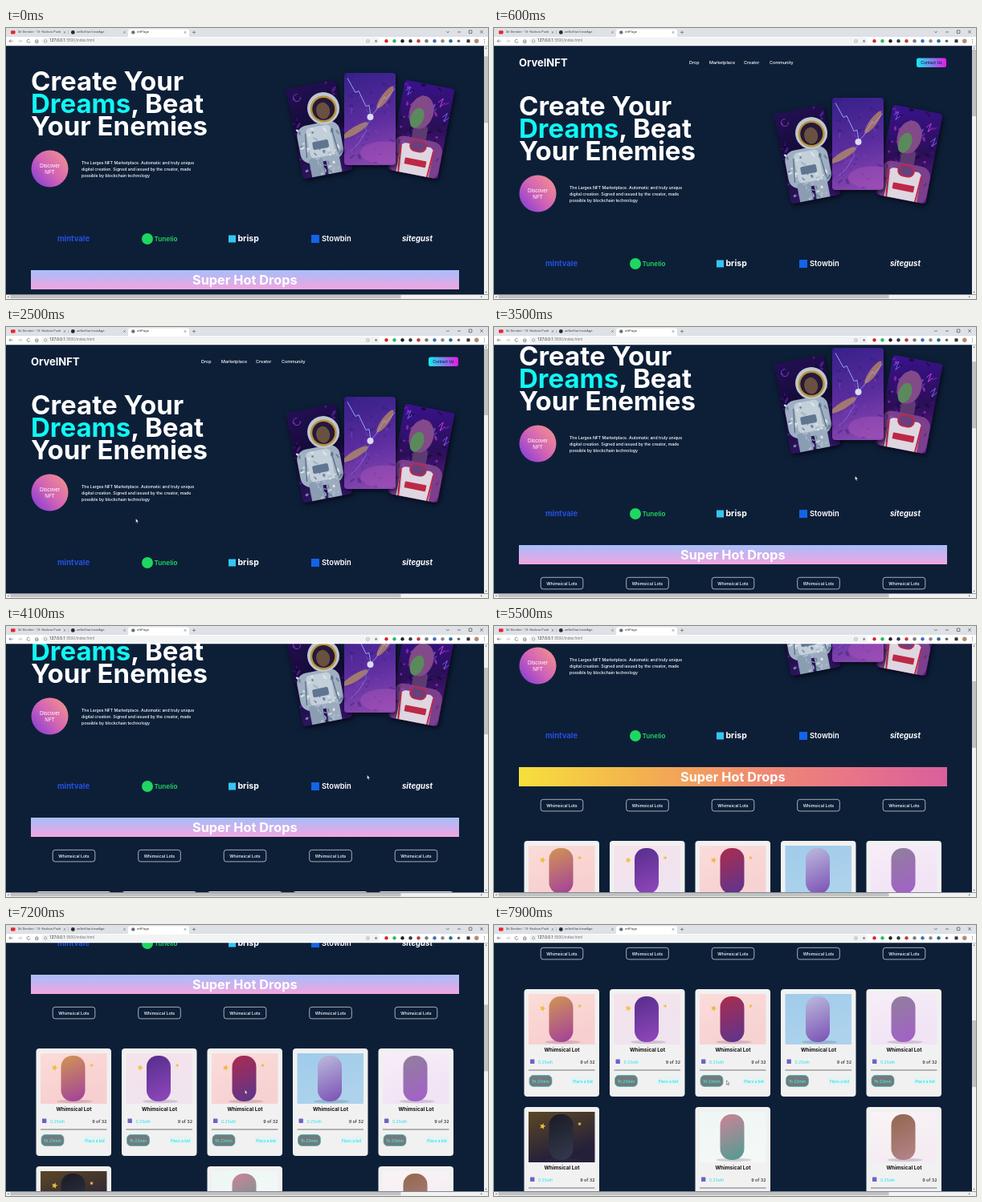
Write an HTML page with a canvas that moves like this. It is 600 px wide and 338 px high and loops after 8 s.

```html
<!DOCTYPE html>
<html lang="en">
<head>
<meta charset="utf-8">
<title>nftPage</title>
<style>
html, body { margin: 0; width: 100%; height: 100%; overflow: hidden; background: #0d1f37; }
#stage { position: relative; width: 600px; height: 338px; overflow: hidden; font-family: Inter, "Open Sans", sans-serif; }
#view { position: absolute; left: 0; top: 22px; width: 595px; height: 310px; overflow: hidden; background: #0d1f37; }
#page { position: absolute; left: 0; top: -22px; width: 600px; height: 690px; will-change: transform; }
canvas { position: absolute; left: 0; top: 0; }
.t { position: absolute; line-height: 0; white-space: pre; }
.c { transform: translateX(-50%); }
.r { transform: translateX(-100%); }
.ui { font-family: Roboto, "Liberation Sans", sans-serif; }
#banner { position: absolute; left: 31px; top: 333.3px; width: 532.5px; height: 23.5px; background: linear-gradient(#a6bff8, #cbb0ee 50%, #f3a6df); }
#banner.hot { background: linear-gradient(90deg, #f6e03c, #f3b24e 28%, #ef8b70 55%, #e87488 78%, #d95f9c); }
#thumb { position: absolute; left: 595.3px; top: 27px; width: 4.3px; height: 83px; background: #c1c1c1; }
#mouse { position: absolute; left: 0; top: 0; }
</style>
</head>
<body>
<div id="stage">
  <div id="view"><div id="page"><canvas id="art"></canvas><div id="banner"></div></div></div>
  <canvas id="frame"></canvas>
  <div id="thumb"></div>
  <svg id="mouse" width="6" height="8" viewBox="0 0 6 8"><path d="M.5 .3V5.6L1.7 4.5 2.5 6.4 3.3 6 2.5 4.2H4.1Z" fill="#fff" stroke="#111" stroke-width=".4"/></svg>
</div>
<script>
const $ = id => document.getElementById(id);
const stage = $('stage'), page = $('page'), banner = $('banner'), mouse = $('mouse'), thumb = $('thumb');
const COLS = [37.5, 144, 250.5, 357, 463.5];
const MID = 47;

function context(id, w, h) {
  const cv = $(id), k = window.devicePixelRatio || 1;
  cv.width = w * k; cv.height = h * k;
  cv.style.width = w + 'px'; cv.style.height = h + 'px';
  const g = cv.getContext('2d');
  g.scale(k, k);
  return g;
}

function text(box, x, y, size, weight, color, str, align = '', extra = '') {
  const d = document.createElement('div');
  d.className = 't ' + align;
  d.style.cssText = `left:${x}px;top:${y}px;font-size:${size}px;font-weight:${weight};color:${color};${extra}`;
  d.textContent = str;
  box.appendChild(d);
}

function rect(g, x, y, w, h, r, fill, stroke, lw = 0.7) {
  g.beginPath();
  g.roundRect(x, y, w, h, r);
  if (fill) { g.fillStyle = fill; g.fill(); }
  if (stroke) { g.strokeStyle = stroke; g.lineWidth = lw; g.stroke(); }
}

function oval(g, x, y, rx, ry, fill, rot = 0) {
  g.beginPath();
  g.ellipse(x, y, rx, ry, rot, 0, Math.PI * 2);
  g.fillStyle = fill;
  g.fill();
}
const dot = (g, x, y, r, fill) => oval(g, x, y, r, r, fill);

function line(g, pts, color, lw = 0.7) {
  g.beginPath();
  for (let i = 0; i < pts.length; i += 2) g.lineTo(pts[i], pts[i + 1]);
  g.strokeStyle = color; g.lineWidth = lw; g.stroke();
}

function blend(g, x0, y0, x1, y1, ...colors) {
  const l = g.createLinearGradient(x0, y0, x1, y1);
  colors.forEach((c, i) => l.addColorStop(i / (colors.length - 1), c));
  return l;
}

function star(g, x, y, r, color) {
  g.beginPath();
  for (let i = 0; i < 10; i++) {
    const a = i * Math.PI / 5 - 1.3, k = i % 2 ? r * 0.45 : r;
    g.lineTo(x + Math.cos(a) * k, y + Math.sin(a) * k);
  }
  g.fillStyle = color; g.fill();
}

// Seeded brush dabs inside a box
function dabs(g, seed, n, x, y, w, h, colors) {
  const rnd = () => (seed = (seed * 16807) % 2147483647) / 2147483647;
  for (let i = 0; i < n; i++)
    oval(g, x + rnd() * w, y + rnd() * h, 1 + rnd() * 3, 0.6 + rnd() * 1.2, colors[i % colors.length], rnd() * 3);
}

// Hero artwork: cards drawn around their own centre
function heroCard(g, x, y, deg, w, h, colors, paint) {
  g.save();
  g.translate(x, y);
  g.rotate(deg * Math.PI / 180);
  g.shadowColor = 'rgba(3,4,16,.85)';
  g.shadowBlur = 6; g.shadowOffsetX = 1.5; g.shadowOffsetY = 2.5;
  rect(g, -w / 2, -h / 2, w, h, 4, blend(g, -w / 4, -h / 2, w / 4, h / 2, ...colors));
  g.shadowColor = 'transparent';
  g.clip();
  paint(g);
  g.restore();
}

function astronaut(g) {
  dabs(g, 11, 60, -32, -57, 64, 114, ['#2c1266', '#0e0726', '#4b1c86']);
  g.strokeStyle = '#8f49d6'; g.lineWidth = 0.8;
  g.beginPath(); g.arc(-20, -44, 4.5, 0, 5); g.stroke();
  rect(g, -29, -8, 54, 48, 13, '#9fb0c2');
  rect(g, -20, 34, 17, 30, 3, '#8b9db3');
  rect(g, 1, 34, 17, 30, 3, '#9cabbd');
  rect(g, -17, -4, 31, 38, 5, '#c3d0da');
  dabs(g, 23, 44, -27, -5, 50, 60, ['#dbe5ea', '#71859f', '#a9bac8']);
  rect(g, -12, 14, 20, 10, 2, '#5f7591');
  line(g, [-18, 2, -22, 32], '#566a86', 1.2);
  line(g, [15, 2, 18, 32], '#566a86', 1.2);
  dot(g, 10, -25, 20, '#bcc7cf');
  dot(g, 10, -24, 16.5, '#b8913c');
  dot(g, 10, -24, 14, '#25193a');
  oval(g, 9, -22, 8.5, 10.5, '#6a5040');
}

function storm(g) {
  dabs(g, 37, 60, -32, -57, 64, 114, ['rgba(72,36,150,.5)', 'rgba(130,66,186,.4)', 'rgba(40,26,110,.4)']);
  oval(g, 18, 42, 30, 14, 'rgba(170,84,184,.45)');
  oval(g, 19, -27, 17, 4.5, '#a07468', 2.2);
  oval(g, -18, 14, 18, 4.5, '#a07a70', -0.55);
  line(g, [-28, -51, -18, -33, -14, -35, -5, -16, -1, -17, 1, -4], '#9fb4ff', 0.9);
  line(g, [31, -38, 20, -25, 18, -28, 7, -10, 1, -4], '#a99cff', 0.8);
  line(g, [1, 0, -6, 12, -4, 14, -14, 30, -24, 40], '#8d7ce8', 0.7);
  dot(g, 0.5, -2.5, 4, '#d9dcf2');
}

function player(g) {
  dabs(g, 53, 70, -32, -57, 64, 114, ['#8a22b4', '#1c0b3c', '#5a1c9a', '#3a1270']);
  for (let i = 0; i < 7; i++) {
    const x = -28 + i * 8.5, y = -44 + (i * 17) % 26;
    line(g, [x, y, x + 5, y - 6, x + 3, y + 5, x + 8, y - 1], i % 2 ? '#d23ce8' : '#7a5cf0', 0.9);
  }
  rect(g, -10, -6, 18, 30, 6, '#5d3a70');
  rect(g, -31, 12, 62, 48, 13, '#7c3f8c');
  oval(g, -4, -21, 15, 21, '#824a88', 0.1);
  oval(g, -8, -13, 8, 13, '#5a8a5c', 0.2);
  dabs(g, 71, 22, -28, 14, 56, 24, ['#9a3fae', '#4f2c66']);
  rect(g, -21, 20, 41, 45, 6, '#ded6e0');
  rect(g, -10, 14, 20, 14, 8, '#6b3f7c', '#c22645', 1.8);
  line(g, [-21, 24, -18, 60], '#c22645', 2);
  line(g, [20, 24, 18, 60], '#c22645', 2);
  rect(g, -13, 38, 27, 8, 1, '#bd2846');
}

function dropCard(g, x, y, look) {
  const [bg, edge, body, shade, prop] = look;
  rect(g, x, y, 93.5, 134, 4, '#f1f1f1');
  g.save();
  rect(g, x + 5.5, y + 6, 82.5, 63, 0.5, blend(g, x, y + 6, x + 20, y + 69, bg, edge));
  g.clip();
  oval(g, x + 48, y + 66, 22, 2.2, 'rgba(70,50,80,.2)');
  rect(g, x + 31, y + 9, 30, 57, 14, blend(g, x + 31, y, x + 61, y + 66, body, shade));
  if (prop) {
    star(g, x + 23, y + 24, 4, prop);
    star(g, x + 69, y + 21, 2.6, prop);
  }
  g.restore();
  text(page, x + MID, y + 76, 6.4, 700, '#111', 'Whimsical Lot', 'c');
  rect(g, x + 7.5, y + 87.5, 5.4, 5.4, 0.4, '#6d62c9');
  text(page, x + 17.5, y + 90.5, 5.1, 400, '#1de3ec', '0.25eth');
  text(page, x + 88, y + 90.5, 5.4, 500, '#222', '9 of 32', 'r');
  line(g, [x + 5.5, y + 101, x + 88, y + 101], '#555', 0.8);
  rect(g, x + 6.5, y + 107.5, 28, 14, 5, '#747a7c', '#3fb9b5');
  text(page, x + 20.5, y + 114.5, 5, 500, '#35f2ee', '1h 23min', 'c');
  rect(g, x + 59, y + 109.5, 28.5, 10, 2, '#e6f3f3');
  text(page, x + 73, y + 114.5, 4.7, 500, '#1fe3e6', 'Place a bid', 'c');
}

function buildPage() {
  const g = context('art', 600, 690);
  text(page, 31, 43, 13, 700, '#fff', 'OrvelNFT');
  [['Drop', 243], ['Marketplace', 268], ['Creator', 311], ['Community', 343]]
    .forEach(([s, x]) => text(page, x, 43, 5.4, 500, '#fff', s));
  rect(g, 526, 37.5, 37, 11.5, 2.5, blend(g, 526, 0, 563, 0, '#12ecee', '#7a84f0', '#ea18e4'));
  text(page, 544.5, 43.3, 5, 500, '#0d1f37', 'Contact Us', 'c');

  text(page, 31, 97, 33, 700, '#fff', 'Create Your');
  text(page, 31, 125, 33, 700, '#fff', ', Beat');
  const beat = page.lastChild, dream = document.createElement('span');
  dream.textContent = 'Dreams';
  dream.style.color = '#10f8f4';
  beat.prepend(dream);
  text(page, 31, 153, 33, 700, '#fff', 'Your Enemies');

  dot(g, 54.5, 206.5, 23, blend(g, 73, 190, 36, 222, '#ee8c92', '#d465b4', '#9242d2'));
  const arial = 'font-family:"Liberation Sans",sans-serif';
  text(page, 54.5, 203, 6.4, 400, '#fff', 'Discover', 'c', arial);
  text(page, 54.5, 210.5, 6.4, 400, '#fff', 'NFT', 'c', arial);
  ['The Larges NFT Marketplace. Automatic and truly unique',
   'digital creation. Signed and issued by the creator, made',
   'possible by blockchain technology']
    .forEach((s, i) => text(page, 94, 199 + i * 7.9, 5.15, 500, '#fff', s));

  heroCard(g, 390, 157.5, -11, 63, 114, ['#220f52', '#130a34', '#34166a'], astronaut);
  heroCard(g, 517, 157.5, 11, 63, 114, ['#38128a', '#2a0f56', '#6a1c96'], player);
  heroCard(g, 453, 144.5, 0, 64, 115, ['#38218a', '#5a2c9e', '#8a48b0'], storm);

  text(page, 84, 294, 9.5, 700, '#2450e2', 'mintvale', 'c');
  dot(g, 176, 294, 7, '#1ed760');
  text(page, 184.5, 294, 8.2, 600, '#1ed760', 'Tunelio');
  rect(g, 277, 289.5, 9, 9, 0, '#36c5f0');
  text(page, 288.5, 294, 10.5, 700, '#fff', 'brisp');
  rect(g, 380, 289, 10, 10, 0, '#1463e8');
  text(page, 393, 294, 9.4, 600, '#fff', 'Stowbin');
  text(page, 512, 294, 9.6, 700, '#fff', 'sitegust', 'c', 'font-style:italic');

  text(page, 297.3, 345, 16.3, 700, '#fff', 'Super Hot Drops', 'c');
  COLS.forEach(x => {
    rect(g, x + MID - 26.3, 373.3, 52.6, 14.6, 3, null, '#e8ecf2');
    text(page, x + MID, 380.6, 5.3, 500, '#fff', 'Whimsical Lots', 'c');
  });

  [['#fbdcd8', '#f8cfd0', '#d8a04a', '#a13f9c', '#f0bd3c'],
   ['#f6e2ea', '#efe4ef', '#4d2a86', '#9248bd', '#efc24a'],
   ['#fbdcda', '#f7d2d3', '#b52b45', '#5b3590', '#efb944'],
   ['#9fcbea', '#acd2ec', '#c4c8e2', '#7a50b4', ''],
   ['#f8edf8', '#f1e4f5', '#8d8496', '#a45fca', '']]
    .forEach((look, i) => dropCard(g, COLS[i], 425, look));
  [[0, '#5d4824', '#25203a', '#17171f', '#343a50', '#e8bb48'],
   [2, '#edf7f4', '#f4f8f6', '#dc8098', '#4f9d92', ''],
   [4, '#faf4f6', '#f4ecf2', '#8d6445', '#b5848b', '']]
    .forEach(([c, ...look]) => dropCard(g, COLS[c], 572, look));
}

function buildFrame() {
  const g = context('frame', 600, 338), ink = '#5f6368';
  const cross = (x, y, r, c) => {
    line(g, [x - r, y - r, x + r, y + r], c, 0.6);
    line(g, [x - r, y + r, x + r, y - r], c, 0.6);
  };
  rect(g, 0, 0, 600, 10.5, 0, '#dee1e6');
  rect(g, 152, 1.5, 76, 10, [2.5, 2.5, 0, 0], '#fff');
  rect(g, 0, 10.3, 600, 12, 0, '#fff');
  rect(g, 6, 3.2, 5.5, 4.4, 1, '#e8242c');
  text(stage, 14.5, 5.4, 4.1, 400, '#45494d', 'Git Dersleri - 13- Kodova Push', 'ui', 'width:56px;overflow:clip;overflow-clip-margin:0;line-height:6px;margin-top:-3px');
  dot(g, 83.3, 5.4, 2.4, '#24292f');
  text(stage, 88, 5.4, 4.3, 400, '#45494d', 'zelkoVan/newAge', 'ui');
  dot(g, 158.3, 5.4, 2.2, '#6a6f75');
  text(stage, 163, 5.4, 4.3, 400, '#333', 'nftPage', 'ui');
  [73, 147.5, 223].forEach(x => cross(x, 5.4, 1.3, ink));
  line(g, [77.5, 3, 77.5, 8], '#a5a9ae', 0.5);
  line(g, [232, 5.4, 236, 5.4], ink);
  line(g, [234, 3.4, 234, 7.4], ink);
  line(g, [548, 4, 550, 6, 552, 4], '#444', 0.6);
  line(g, [562, 5, 566, 5], '#333', 0.6);
  rect(g, 576.3, 3, 3.6, 3.6, 0, null, '#333', 0.6);
  cross(592, 4.8, 1.8, '#333');

  line(g, [8.5, 16.3, 4, 16.3], ink);
  line(g, [6, 14.3, 4, 16.3, 6, 18.3], ink);
  line(g, [15, 16.3, 19.5, 16.3], '#b5b8bc');
  line(g, [17.5, 14.3, 19.5, 16.3, 17.5, 18.3], '#b5b8bc');
  g.beginPath(); g.arc(28, 16.3, 2, 0.3, 5.6);
  g.strokeStyle = ink; g.lineWidth = 0.7; g.stroke();
  line(g, [36, 16.3, 38.3, 14.2, 40.6, 16.3], ink);
  rect(g, 36.8, 16.3, 3, 2.2, 0, null, ink);
  rect(g, 44, 11.8, 421, 9, 4.5, '#f1f3f4');
  rect(g, 47.5, 14.6, 3.4, 3.4, 1.7, null, ink, 0.5);
  text(stage, 54, 16.4, 4.8, 400, '#202124', '127.0.0.1', 'ui');
  const port = document.createElement('span');
  port.textContent = ':5500/index.html';
  port.style.color = '#777b80';
  stage.lastChild.append(port);
  rect(g, 448.8, 14.8, 3.2, 3.2, 0.5, null, '#777', 0.5);
  star(g, 460.6, 16.3, 2.1, '#777');
  ['#d6262d', '#25bd60', '#202226', '#2c3a45', '#c23b3b', '#777c82', '#3d6fc0', '#888', '#2c6b91', '#5f6368']
    .forEach((c, i) => dot(g, 473.5 + i * 10, 16.3, i === 9 ? 1.8 : 2.2, c));
  rect(g, 573.5, 14.3, 4, 4, 0.6, '#303438');
  dot(g, 585.8, 16.3, 2.7, '#b48a70');
  [14.4, 16.3, 18.2].forEach(y => dot(g, 595.5, y, 0.5, ink));

  rect(g, 595, 22.3, 5, 310, 0, '#f1f1f1');
  rect(g, 0, 332.4, 600, 5.6, 0, '#f1f1f1');
  rect(g, 5.5, 333, 486, 4.3, 0, '#c1c1c1');
  const tri = (x, y, dx, dy) => {
    g.beginPath();
    g.moveTo(x + dx, y + dy);
    g.lineTo(x - dx + dy, y - dy + dx);
    g.lineTo(x - dx - dy, y - dy - dx);
    g.fillStyle = '#666'; g.fill();
  };
  tri(2.5, 335.2, -1, 0);
  tri(592, 335.2, 1, 0);
  tri(597.6, 24.8, 0, -1);
  tri(597.6, 329.8, 0, 1);
}

// Wheel notches: time, direction
const LOOP = 8000, NOTCH = 31.33, GLIDE = 170;
const WHEEL = [[3150, 1], [3400, 1], [3750, 1], [4600, 1], [4900, 1],
               [6380, 1], [6750, 1], [6950, 1], [7150, 1], [7400, 1], [7620, 1], [200, -1]];
// Pointer stops: time, x, y
const PATH = [[1500, 545, 43], [2250, 161, 238.5], [2700, 161, 238.5], [3200, 449, 185.5], [5050, 449, 185.5],
              [5350, 330, 187], [5750, 330, 187], [6200, 314, 231], [6700, 314, 231], [7500, 289, 193.5], [8000, 289, 193.5]];

const clamp = v => Math.max(0, Math.min(1, v));

function scrollAt(t) {
  let n = 1;
  for (const [at, dir] of WHEEL) n += dir * (1 - (1 - clamp((t - at) / GLIDE)) ** 3);
  return Math.round(n * NOTCH);
}

function pointerAt(t) {
  if (t < PATH[0][0]) return null;
  const i = PATH.findIndex(p => p[0] > t), a = PATH[i - 1], b = PATH[i];
  const u = (t - a[0]) / (b[0] - a[0]), k = u * u * (3 - 2 * u);
  return [a[1] + (b[1] - a[1]) * k, a[2] + (b[2] - a[2]) * k];
}

function draw(now) {
  const t = now % LOOP, s = scrollAt(t), p = pointerAt(t);
  page.style.transform = `translateY(${-s}px)`;
  thumb.style.transform = `translateY(${s * 0.267}px)`;
  const hot = !!p && p[0] > 31 && p[0] < 563 && p[1] + s > 333 && p[1] + s < 357;
  banner.classList.toggle('hot', hot);
  const overTitle = hot && p[0] > 233 && p[0] < 361;
  mouse.style.display = p && !overTitle ? 'block' : 'none';
  if (p) mouse.style.transform = `translate(${p[0]}px,${p[1]}px)`;
}

buildPage();
buildFrame();
stage.append(mouse);
const start = performance.now();
function tick() {
  draw(performance.now() - start);
  requestAnimationFrame(tick);
}
tick();
</script>
</body>
</html>
```
